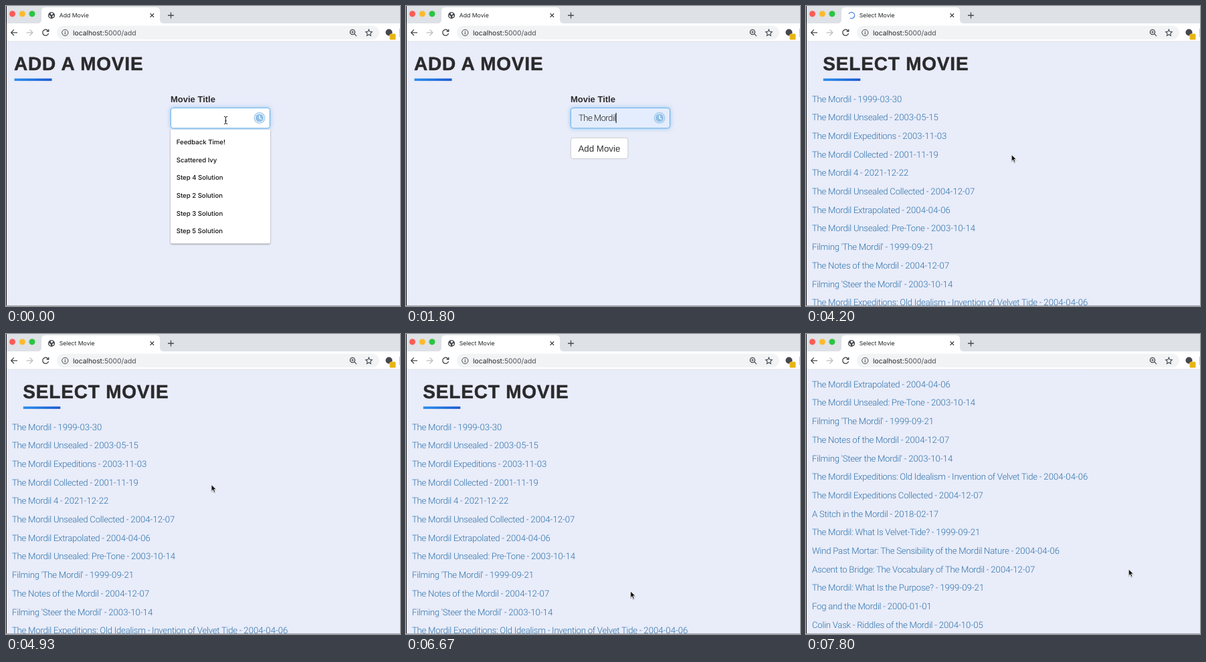
Animation, 589 px wide and 449 px high, one loop 8000 ms. Source, as an HTML page:

```html
<!DOCTYPE html>
<html lang="en">
<head>
<meta charset="utf-8">
<title>Add Movie</title>
<style>
  html, body { margin: 0; width: 100%; height: 100%; overflow: hidden; background: #e9ecf9; }
  svg { display: block; width: 589px; height: 449px; }
  text { white-space: pre; text-rendering: geometricPrecision; }
  .ui { font-family: Inter, sans-serif; fill: #24272b; }
  .tab { font-size: 8.7px; }
  .url { font-size: 10.3px; }
  .option { font-size: 9.6px; font-weight: 500; fill: #111; }
  .heading { font: bold 28px "Liberation Sans", Arial, sans-serif; letter-spacing: .8px; fill: #2a2a2c; stroke: #2a2a2c; stroke-width: .5; }
  .label { font: bold 13px "Liberation Sans", Arial, sans-serif; fill: #2a2b2e; }
  .button { font: 13.3px "Liberation Sans", Arial, sans-serif; fill: #333; }
  .value { font: 300 13.2px Roboto, sans-serif; letter-spacing: -.6px; fill: #222; }
  .link { font: 300 13.2px Roboto, sans-serif; letter-spacing: -.26px; fill: #2b72aa; }
  .link .date { letter-spacing: 0; }
  .link.hover { fill: #1d4568; text-decoration: underline; }
  .icon { fill: none; stroke: #45494e; stroke-width: 1.3; }
  #field { filter: drop-shadow(0 0 3px rgba(102, 175, 233, .65)); }
  #menu { filter: drop-shadow(0 1px 1.2px rgba(0, 0, 0, .4)); }
  .cursor { filter: drop-shadow(0 1px .7px rgba(0, 0, 0, .3)); }
</style>
</head>
<body>
<svg viewBox="0 0 589 449">
  <defs>
    <linearGradient id="blue"><stop stop-color="#2b8eea"/><stop offset="1" stop-color="#1c59d2"/></linearGradient>
    <clipPath id="view"><rect y="53" width="589" height="395"/></clipPath>
  </defs>
  <rect width="589" height="449" fill="#e9ecf9"/>

  <g id="formPage">
    <text class="heading" x="12" y="95.8">ADD A MOVIE</text>
    <rect x="12.5" y="108.5" width="56" height="3.6" fill="url(#blue)"/>
    <text class="label" x="246" y="143.5">Movie Title</text>
    <rect id="submit" x="246.3" y="197.3" width="85.6" height="31.3" rx="3.5" fill="#fff" stroke="#ccc"/>
    <text class="button" x="257.5" y="217.8">Add Movie</text>
    <rect id="field" x="246.3" y="152.6" width="148.2" height="30.3" rx="3.5" fill="#fff" stroke="#66afe9"/>
    <g transform="translate(379 167.5)">
      <circle r="7.8" fill="none" stroke="#9cc6ea" stroke-width="1.3"/>
      <circle r="6" fill="#90bfe6"/>
      <path d="M0-3.7V.4L3 1.8" fill="none" stroke="#fff" stroke-width="1.3"/>
    </g>
    <text id="value" class="value" x="258" y="172.3"></text>
    <rect id="caret" y="160" width="1.1" height="15" fill="#111"/>
    <g id="menu">
      <rect id="menuBox" x="246" y="185" width="149" rx="2" fill="#fff"/>
      <rect id="menuMark" x="246" y="190.5" width="149" height="26.6" fill="#e8e8e8"/>
      <g id="options"></g>
    </g>
  </g>

  <g id="listPage" clip-path="url(#view)">
    <g id="scroller">
      <text class="heading" x="25.3" y="95.8">SELECT MOVIE</text>
      <rect x="25.8" y="108.5" width="55.5" height="3.6" fill="url(#blue)"/>
      <g id="links"></g>
    </g>
  </g>

  <rect width="589" height="26" fill="#dee1e6"/>
  <rect y="26" width="589" height="27" fill="#fff"/>
  <path d="M47 26q6 0 6-6V8q0-6 6-6h165q6 0 6 6v12q0 6 6 6z" fill="#fff"/>
  <rect y="52.6" width="589" height=".7" fill="#d5d8df"/>
  <circle cx="9.5" cy="11.8" r="4.5" fill="#fc5b57"/>
  <circle cx="24.4" cy="11.8" r="4.5" fill="#fdbb2d"/>
  <circle cx="39" cy="11.8" r="4.5" fill="#2bc640"/>
  <g id="globe" transform="translate(68 14)">
    <circle r="5.1" fill="#45494e"/>
    <path d="M-4-.8L-1.2 1.2V3.8Q-3.8 2.6-4-.8M-.6-4L2.6-3.2 1.4-1.2-.4-.8-1.2-2.2M1.2.6L3.8 0Q3.6 2.6 1.8 3.4z" fill="#fff"/>
  </g>
  <path id="spinner" d="M0-4.6A4.6 4.6 0 1 1-4.6 0" fill="none" stroke="#4a86e8" stroke-width="1.4"/>
  <text id="tabTitle" class="ui tab" x="79.7" y="17.2"></text>
  <path class="icon" d="M215.5 11.2l5.6 5.6m0-5.6l-5.6 5.6M246.5 9.5v9m-4.5-4.5h9"/>
  <path class="icon" d="M17 39.8H7.6m4.4-4.4L7.6 39.8l4.4 4.4"/>
  <path class="icon" d="M30.5 39.8h9.4m-4.4-4.4l4.4 4.4-4.4 4.4" style="stroke:#bbbec3"/>
  <path class="icon" d="M63 37.2A4.5 4.5 0 1 0 63.6 41M63.8 34.8v3.2h-3.2"/>
  <rect x="76" y="29.6" width="482" height="20.4" rx="10.2" fill="#f1f3f4"/>
  <circle class="icon" cx="88.3" cy="39.9" r="4.6" style="stroke-width:1"/>
  <path class="icon" d="M88.3 39.2v3.3m0-5.2v1.1" style="stroke-width:1.1"/>
  <text class="ui url" x="100" y="43.6">localhost<tspan fill="#4c4f54">:5000/add</tspan></text>
  <g class="icon">
    <circle cx="518" cy="39" r="3.6"/>
    <path d="M520.7 41.7l3.3 3.3M516.2 39h3.6m-1.8-1.8v3.6" stroke-width="1.1"/>
    <path d="M542.5 35.2l1.4 3.1 3.4.4-2.5 2.3.7 3.4-3-1.7-3 1.7.7-3.4-2.5-2.3 3.4-.4z" stroke-width="1.1"/>
  </g>
  <circle cx="572.5" cy="39.5" r="5" fill="#45494e"/>
  <rect x="573.5" y="41.5" width="9" height="9" rx="1.5" fill="#e9b417"/>
  <rect x="588" y="34" width="1" height="12" fill="#c4c7cc"/>
  <rect width="1" height="449" fill="#17181b"/>
  <rect y="448" width="589" height="1" fill="#a4a6ae"/>

  <g id="cursor">
    <g id="beam" fill="none">
      <path d="M-2.6-5.6Q0-5.6 0-4Q0-5.6 2.6-5.6M0-4V4M-2.6 5.6Q0 5.6 0 4Q0 5.6 2.6 5.6M-1.4 1h2.8" stroke="#fff" stroke-width="2.2"/>
      <path d="M-2.6-5.6Q0-5.6 0-4Q0-5.6 2.6-5.6M0-4V4M-2.6 5.6Q0 5.6 0 4Q0 5.6 2.6 5.6M-1.4 1h2.8" stroke="#222"/>
    </g>
    <path id="arrow" class="cursor" d="M0 0V9.8L2.3 7.7 3.9 11.4 5.7 10.6 4.1 7H7.2z" fill="#111" stroke="#fff" stroke-width=".8"/>
    <path id="hand" class="cursor" d="M-1 1Q0-.5 1 1L1.6 4.2Q3 3.4 3.6 4.5 5 4 5.4 5.2 6.8 5 7 6.4L6.6 9.2 5.6 12H0L-3.6 7.4Q-3.4 5.8-1.6 6.8L-.4 7.6zM1.8 7.6V10M3.4 7.6V10M5 7.6V10" fill="#fff" stroke="#333" stroke-width=".9"/>
  </g>
</svg>
<script>
const $ = id => document.getElementById(id);
const LOOP = 8000, STEP = 1000 / 15, ROW = 27.67, OPTION = 26.6;
const NAME = 'The Mordil';

const MOVIES = [
  NAME + '|1999-03-30',
  NAME + ' Unsealed|2003-05-15',
  NAME + ' Expeditions|2003-11-03',
  NAME + ' Collected|2001-11-19',
  NAME + ' 4|2021-12-22',
  NAME + ' Unsealed Collected|2004-12-07',
  NAME + ' Extrapolated|2004-04-06',
  NAME + ' Unsealed: Pre-Tone|2003-10-14',
  "Filming 'The Mordil'|1999-09-21",
  'The Notes of the Mordil|2004-12-07',
  "Filming 'Steer the Mordil'|2003-10-14",
  NAME + ' Expeditions: Old Idealism - Invention of Velvet Tide|2004-04-06',
  NAME + ' Expeditions Collected|2004-12-07',
  'A Stitch in the Mordil|2018-02-17',
  NAME + ': What Is Velvet-Tide?|1999-09-21',
  'Wind Past Mortar: The Sensibility of the Mordil Nature|2004-04-06',
  'Ascent to Bridge: The Vocabulary of The Mordil|2004-12-07',
  NAME + ': What Is the Purpose?|1999-09-21',
  'Fog and the Mordil|2000-01-01',
  'Colin Vask - Riddles of the Mordil|2004-10-05'
];

const ALL_OPTIONS = ['Feedback Time!', 'Scattered Ivy', ...[4, 2, 3, 5].map(n => `Step ${n} Solution`)];
const MATCHES = [NAME, 'The Long Fern', 'The Paper Kiln'];

// Each track is a list of [start time, value]; values hold until the next start.
const TYPED = [[0, ''], [333, 'T'], [400, 'Th'], [467, 'The'], [733, 'The '], [800, 'The M'], [1533, NAME]];
const CARET = [[0, 0], [333, 1], [1267, 0], [1600, 1], [2267, 0], [2800, 1], [3333, 0], [3800, 1]];
const MENU = [[0, ALL_OPTIONS], [333, MATCHES], [800, [NAME]], [1800, []]];

// [time, x, y] of the cursor hot spot, and [time, offset] of the page.
const PATH = [
  [67, 328.5, 171], [200, 440, 200], [267, 487, 215], [2532, 318, 188], [2800, 308, 221],
  [3067, 308, 221], [3333, 308, 214], [4000, 308, 214], [4267, 307, 225.5], [4933, 307, 225.5],
  [5133, 338, 270], [5400, 310, 330], [5733, 240, 388], [5933, 209.5, 423.5], [6200, 215, 405],
  [6600, 300, 395], [6933, 478, 345], [7000, 482, 348], [7200, 482.3, 352]
];
const SCROLL = [[6867, 0], [6933, 5], [7000, 25.5], [7067, 95], [7133, 175], [7200, 230]];

function hold(track, t) {
  return track.filter(([start]) => start <= t + 1).pop()[1];
}

function glide(track, t) {
  const i = track.findIndex(([start]) => start > t);
  if (i < 0) return track[track.length - 1].slice(1);
  if (i === 0) return track[0].slice(1);
  const [a, ...from] = track[i - 1], [b, ...to] = track[i];
  return from.map((v, k) => v + (to[k] - v) * (t - a) / (b - a));
}

function show(id, on) {
  $(id).style.display = on ? '' : 'none';
}

function addText(parent, className, x, y, content) {
  const node = document.createElementNS('http://www.w3.org/2000/svg', 'text');
  node.setAttribute('class', className);
  node.setAttribute('x', x);
  node.setAttribute('y', y);
  node.innerHTML = content;
  parent.append(node);
  return node;
}

const links = MOVIES.map((movie, i) => {
  const [title, date] = movie.split('|');
  return addText($('links'), 'link', 9, 143.8 + i * ROW, `${title} - <tspan class="date">${date}</tspan>`);
});
const options = ALL_OPTIONS.map((_, i) => addText($('options'), 'ui option', 254.7, 207.2 + i * OPTION, ''));

function drawForm(t, overButton) {
  const items = hold(MENU, t);
  show('menu', items.length);
  $('menuBox').setAttribute('height', 11 + items.length * OPTION);
  options.forEach((node, i) => node.textContent = items[i] || '');
  show('menuMark', t > 1532 && t < 1799);

  $('value').textContent = hold(TYPED, t);
  $('caret').setAttribute('x', 258 + $('value').getComputedTextLength());
  show('caret', hold(CARET, t));
  $('field').setAttribute('fill', t > 1532 ? '#e4edfd' : '#fff');
  $('submit').setAttribute('fill', t > 3799 ? '#d4d4d4' : overButton ? '#e6e6e6' : '#fff');
  $('submit').setAttribute('stroke', overButton ? '#adadad' : '#ccc');
}

function drawList(t, x, y) {
  const [offset] = glide(SCROLL, t);
  let overLink = false;
  $('scroller').setAttribute('transform', `translate(0 ${-offset})`);
  links.forEach((link, i) => {
    const gap = Math.abs(y - (139 + i * ROW - offset));
    const inside = x >= 9 && x <= 9 + link.getComputedTextLength();
    link.classList.toggle('hover', inside && gap < 9);
    overLink = overLink || inside && gap < 6;
  });
  return overLink;
}

function draw(now) {
  const t = Math.floor((now % LOOP + 7) / STEP) * STEP % LOOP;
  const [x, y] = glide(PATH, t);
  const onForm = t < 4132;
  const loading = t > 3799 && t < 4399;
  const overButton = onForm && t > 2532 && y > 197 && y < 229;

  show('formPage', onForm);
  show('listPage', !onForm);
  if (onForm) drawForm(t, overButton);
  const overLink = !onForm && drawList(t, x, y);

  $('tabTitle').textContent = onForm ? 'Add Movie' : 'Select Movie';
  show('globe', !loading);
  show('spinner', loading);
  $('spinner').setAttribute('transform', `translate(68 14) rotate(${t * .5})`);

  const beam = onForm && t < 132;
  const hand = overButton || overLink;
  show('cursor', t < 332 || t > 2532);
  $('cursor').setAttribute('transform', `translate(${x} ${y})`);
  show('beam', beam);
  show('hand', hand);
  show('arrow', !beam && !hand);
}

const start = performance.now();
(function tick() {
  draw(performance.now() - start);
  requestAnimationFrame(tick);
})();
</script>
</body>
</html>
```
